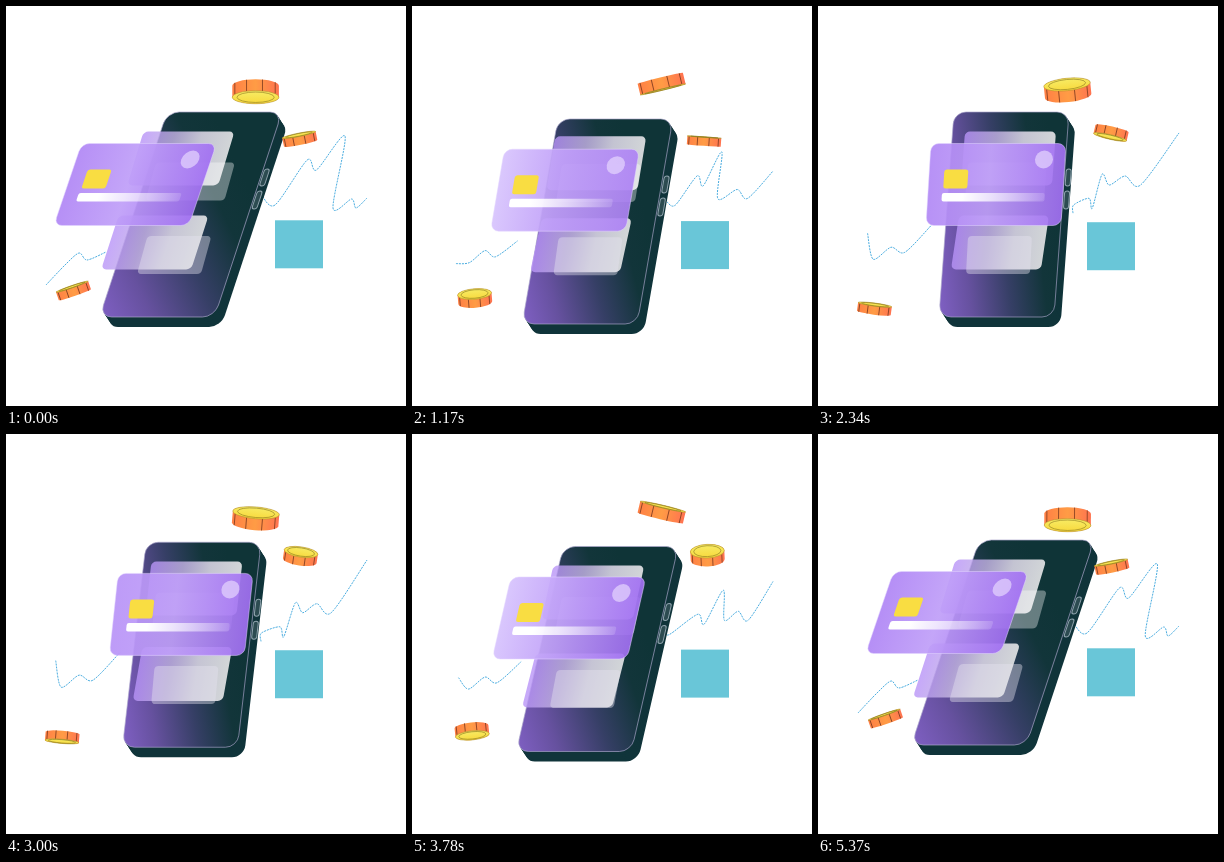
Write an HTML page that moves like this. It is 400 px wide and 400 px high and loops after 5.4 s.

```html
<!DOCTYPE html>
<html lang="en">
<head>
<meta charset="utf-8">
<title>Floating card and phone</title>
<style>
  html, body { margin: 0; width: 100%; height: 100%; overflow: hidden; background: #fff; }
  svg { display: block; width: 100vw; height: 100vh; }
  .chart { stroke: #36a3dc; stroke-width: .9; stroke-dasharray: 2 1; }
</style>
</head>
<body>
<svg viewBox="0 0 400 400" fill="none">
  <defs>
    <linearGradient id="screen" gradientUnits="userSpaceOnUse" x1="0" y1="205" x2="128" y2="100">
      <stop offset="0" stop-color="#8060c4"/>
      <stop offset=".25" stop-color="#66519f"/>
      <stop offset=".55" stop-color="#363f66"/>
      <stop offset=".82" stop-color="#12353a"/>
      <stop offset="1" stop-color="#0f3437"/>
    </linearGradient>
    <linearGradient id="panel">
      <stop offset="0" stop-color="#b893f8" stop-opacity=".8"/>
      <stop offset=".35" stop-color="#c3b2e4" stop-opacity=".82"/>
      <stop offset=".65" stop-color="#d3d0df" stop-opacity=".92"/>
      <stop offset="1" stop-color="#dcdee0" stop-opacity=".95"/>
    </linearGradient>
    <linearGradient id="sheen">
      <stop offset="0"/><stop offset=".45"/><stop offset="1"/>
    </linearGradient>
    <linearGradient id="stripe">
      <stop offset=".2" stop-color="#fff"/>
      <stop offset="1" stop-color="#fff" stop-opacity=".15"/>
    </linearGradient>
    <linearGradient id="rim">
      <stop offset="0" stop-color="#ff7f45"/>
      <stop offset=".5" stop-color="#ff9c45"/>
      <stop offset="1" stop-color="#ff7350"/>
    </linearGradient>
    <linearGradient id="gold" x2="0" y2="1">
      <stop offset="0" stop-color="#f7ec66"/>
      <stop offset="1" stop-color="#f8d93c"/>
    </linearGradient>
  </defs>

  <rect x="269" y="-24" width="48" height="48" fill="#69c6d8" id="gem"/>
  <path id="chartLeft" class="chart"/>
  <path id="chartRight" class="chart"/>

  <g id="phone">
    <g id="body" fill="#10343a"></g>
    <rect width="115" height="205" rx="12" fill="url(#screen)" stroke="#aba6cb" stroke-opacity=".8" stroke-width=".8"/>
    <g stroke="#8fa3ad" fill="#fff" fill-opacity=".12">
      <rect x="116.5" y="57" width="5" height="17" rx="2.5"/>
      <rect x="116.5" y="79" width="5" height="18" rx="2.5"/>
    </g>
  </g>

  <g id="top"><rect width="91" height="54" rx="5" fill="url(#panel)"/></g>
  <g id="topSmall"><rect width="79" height="38" rx="4" fill="#fff" fill-opacity=".36"/></g>
  <g id="low"><rect width="90" height="54" rx="5" fill="url(#panel)"/></g>
  <g id="lowSmall"><rect width="64" height="38" rx="4" fill="#e4e2ee" fill-opacity=".42"/></g>

  <g id="card">
    <rect width="135" height="82" rx="8" fill="url(#sheen)" fill-opacity=".92" stroke="#e3d5ff" stroke-opacity=".6" stroke-width=".8"/>
    <rect x="15" y="26" width="24" height="19" rx="2.5" fill="#f9dd42"/>
    <rect x="14" y="49.5" width="103" height="8.5" rx="2" fill="url(#stripe)"/>
    <circle cx="114" cy="16" r="9" fill="#e6d6fd" fill-opacity=".7"/>
  </g>
</svg>

<script>
const LOOP = 5400, STEP = 30;
const { sin, cos, abs, PI } = Math;
const svg = document.querySelector('svg');
const $ = id => document.getElementById(id);

function make(tag, attrs, parent = svg) {
  const el = document.createElementNS('http://www.w3.org/2000/svg', tag);
  for (const k in attrs) el.setAttribute(k, attrs[k]);
  return parent.appendChild(el);
}

// Smooth hump from 0 to 1 and back around a moment.
const hump = (t, mid, half) => abs(t - mid) < half ? cos((t - mid) / half * PI / 2) ** 2 : 0;

// Everything the parts share at one moment.
function moment(t) {
  const a = 2 * PI * t / LOOP;
  return {
    a,
    sway: (1 + cos(a + .465)) / 2,
    slide: (1 - cos(a + .093)) / 2,
    sink: hump(t, 1150, 800),
    drop: hump(t, 750, 750),
    late: hump(t, 3750, 1250),
  };
}

// Place a flat sheet of height h: top edge at (x, y), bottom edge starting at foot.
const place = (id, h, x, y, foot) =>
  $(id).setAttribute('transform', `matrix(1 0 ${(foot - x) / h} 1 ${x} ${y})`);

for (let i = 6; i > 0; i--)
  make('rect', { width: 115, height: 205, rx: 12, y: i * 10 / 6 }, $('body'));

function drawPhone({ sway, sink, late }) {
  const x = 136 + 26.5 * sway, foot = 121 - 29 * sway, lean = x - foot;
  place('phone', 205, x, 106 + 7 * sink + 6.5 * late, foot);
  // Depth keeps its direction on the stage while the face slants.
  [...$('body').children].forEach((r, i) =>
    r.setAttribute('x', (6 - i) / 6 * (6.5 + lean * 10 / 205)));
  $('screen').setAttribute('y2', 100 + (69 - lean) * 1.5);
}

function drawSheets({ sway, slide, drop, late }) {
  place('top', 54, 147 - 10 * sway, 125.5 + 11.5 * drop + 6 * late, 143 - 23 * sway);
  place('topSmall', 38, 150, 156.5 + 3.5 * drop + 6.5 * late, 147 - 8 * sway);
  place('low', 54, 141 - 30 * sway, 209.5 + 6.5 * drop + 10 * late, 133 - 40 * sway);
  place('lowSmall', 38, 150 - 9 * sway, 230 + 3 * drop + 6 * late, 148 - 18 * sway);
  const x = 75.5 + 38.5 * slide;
  place('card', 82, x, 137.5 + 14 * drop + 5.5 * late, x - 5 - 24 * sway);
}

const DEEP = [154, 100, 240], PALE = [222, 206, 255];
function drawSheen({ a, drop }) {
  const light = [.6 + .3 * cos(2 * a - 2.8), .55, .1 + .45 * drop];
  [...$('sheen').children].forEach((stop, i) => stop.setAttribute('stop-color',
    `rgb(${DEEP.map((c, k) => Math.round(c + (PALE[k] - c) * light[i]))})`));
}

// A coin's pose: centre, tilt in degrees, and how far its face turns up (+) or down (-).
function coin(r, h, pose) {
  const g = make('g'), d = h / 2;
  const rim = make('path', { fill: 'url(#rim)' }, g);
  const ridges = make('path', { stroke: '#8c4424', 'stroke-width': .9 }, g);
  const face = make('ellipse', { fill: 'url(#gold)', stroke: '#a8922a', 'stroke-width': .5 }, g);
  const ring = make('ellipse', { stroke: '#8a7a20', 'stroke-width': .6 }, g);
  return ({ a }) => {
    const { x, y, tilt, turn } = pose(a), ry = r * abs(turn);
    g.setAttribute('transform', `translate(${x} ${y}) rotate(${tilt})`);
    rim.setAttribute('d', `M${-r} ${-d}A${r} ${ry} 0 0 1 ${r} ${-d}V${d}A${r} ${ry} 0 0 1 ${-r} ${d}Z`);
    let lines = '';
    for (let w = -1.1; w < 1.2; w += .7) {
      const bow = r * turn * cos(w);
      lines += `M${r * sin(w)} ${bow - d}V${bow + d}`;
    }
    ridges.setAttribute('d', lines);
    for (const [el, k] of [[face, 1], [ring, .8]]) {
      el.setAttribute('cy', turn > 0 ? -d : d);
      el.setAttribute('rx', r * k);
      el.setAttribute('ry', ry * k);
    }
  };
}

const coins = [
  coin(23.3, 11.5, a => ({
    x: 249.6, y: 81.5 + 4 * cos(2 * a), tilt: -14 * sin(a), turn: -.28 * cos(a + .1) })),
  coin(17, 8.5, a => ({
    x: 293.8 - 1.8 * sin(a), y: 128.5 + 7.5 * cos(a - .93), tilt: 13 * sin(a - 1.05),
    turn: .1 - .18 * sin(a) + .22 * sin(2 * a) })),
  coin(17, 8.5, a => ({
    x: 61.7 + 5.8 * cos(a), y: 294.2 - 9.5 * cos(a), tilt: -6 - 13 * cos(a) + 4 * sin(a),
    turn: .02 + .29 * sin(a + .17) })),
];

// Smooth path through a few points.
function smooth(pts) {
  const p = i => pts[Math.max(0, Math.min(pts.length - 1, i))];
  let d = 'M' + p(0);
  for (let i = 0; i < pts.length - 1; i++) {
    const [before, from, to, after] = [p(i - 1), p(i), p(i + 1), p(i + 2)];
    d += 'C' + [from.map((q, k) => q + (to[k] - before[k]) / 7),
                to.map((q, k) => q - (after[k] - from[k]) / 7), to];
  }
  return d;
}

// Chart: a steep peak wanders along the line and flattens halfway through the loop.
function drawChart({ a }) {
  const c = cos(a), s = sin(a);
  $('chartLeft').setAttribute('d', smooth([
    [45 - 5 * c, 252 + 27 * c], [57 + 2 * c, 256 + 3 * c], [73, 244 + 3 * c],
    [84 - 3 * c, 250 + 4 * c], [107 - 7 * c, 232 + 14 * c]]));

  const left = 255, right = 361;
  const px = 312 + 27 * c - 8 * s, py = 150 - 20 * c, fall = 40 + 32 * c;
  const rise = k => left + (px - left) * k, tail = k => px + (right - px) * k;
  $('chartRight').setAttribute('d', smooth([
    [left, 198 - 10 * c], [left + 7 * (1 + c), 199], [rise(.55), py + 24], [rise(.66), py + 34],
    [px, py], [px - 2 - 10 * c, py + fall], [tail(.3), py + fall - 9],
    [tail(.5), py + fall], [right, 158 + 34 * c]]));
}

function draw(now) {
  const m = moment(Math.floor(now % LOOP / STEP) * STEP);
  drawPhone(m);
  drawSheets(m);
  drawSheen(m);
  drawChart(m);
  coins.forEach(move => move(m));
  $('gem').setAttribute('transform', `translate(0 ${239.3 - cos(m.a)})`);
}

const start = performance.now();
function tick() {
  draw(performance.now() - start);
  requestAnimationFrame(tick);
}
tick();
</script>
</body>
</html>
```
